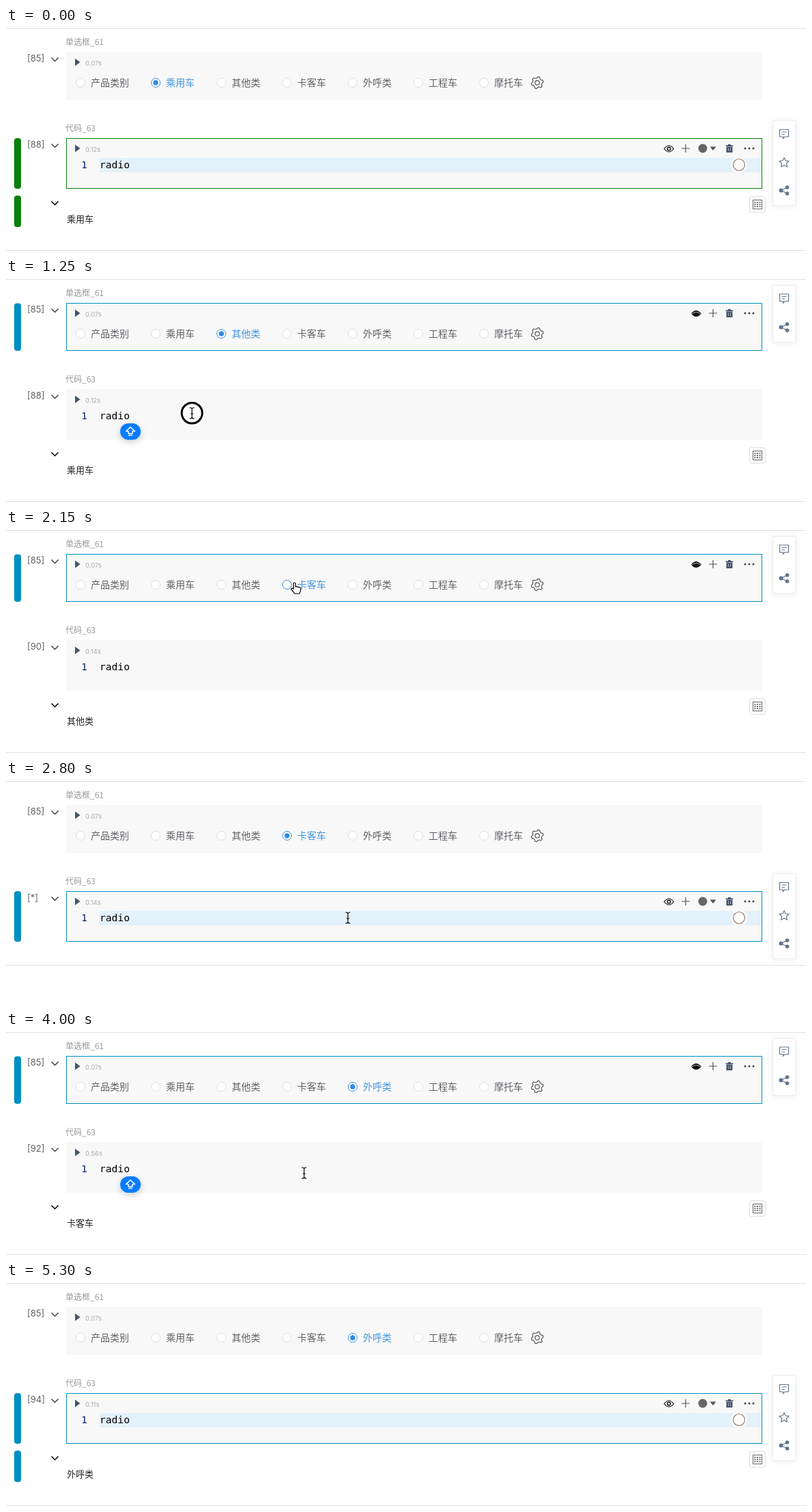
Animation, 1170 px wide and 326 px high, one loop 5520 ms. Source, as an HTML page:

```html
<!DOCTYPE html>
<html lang="zh-CN">
<head>
<meta charset="utf-8">
<style>
html, body { margin: 0; width: 100%; height: 100%; overflow: hidden; background: #fff; }
svg { display: block; width: 1170px; height: 326px; }
text { font: 14px "Noto Sans CJK SC", "Noto Sans CJK", sans-serif; fill: #606266; }
.title { font-size: 12px; fill: #999; }
.count { font: 13px Inter, sans-serif; fill: #616161; }
.time { font: 9.5px Inter, sans-serif; fill: #aaa; }
.code { font: 14.6px "DejaVu Sans Mono", monospace; fill: #000; }
.out { font-size: 13px; fill: #222; }
.add { font-size: 12px; fill: #fff; }
.line { fill: none; stroke: #555; stroke-width: 1.2; }
.slate { fill: none; stroke: #5f7690; stroke-width: 1.2; }
.chevron { fill: none; stroke: #444; stroke-width: 1.5; }
.panel { fill: #fff; stroke: #eee; filter: drop-shadow(0 1px 4px #0001); }
</style>
</head>
<body>
<svg viewBox="0 0 1170 326">
  <defs>
    <path id="chevron" class="chevron" d="M-5-2.5 0 2.5 5-2.5"/>
    <path id="play" d="M101-5.5 108.5 0 101 5.5Z" fill="#44546a"/>
    <g id="tools">
      <path class="line" d="M988 0h12M994-6V6"/>
      <path d="M1052.500-4.500h11v1.500h-11zM1056-6h4v1.500h-4zM1053.500-2.500h9V6h-9z" fill="#44546a"/>
      <path d="M1056.500-.5v4.500M1059.500-.5v4.500" stroke="#aab2bd"/>
      <g fill="#444"><circle cx="1081" r="1.500"/><circle cx="1087" r="1.500"/><circle cx="1093" r="1.500"/></g>
    </g>
    <g id="comment" class="slate">
      <path d="M-6.500-6h13V4.500H1L-1.500 7V4.500h-5zM-3.500-2.500h7M-3.500 1h4.500"/>
    </g>
    <g id="share" fill="#5f7690">
      <path class="slate" d="M4.500-4.500-4.500 0 4.500 4.500"/>
      <circle cx="-4.500" r="3"/><circle cx="4.500" cy="-4.500" r="2.800"/><circle cx="4.500" cy="4.500" r="2.800"/>
    </g>
  </defs>

  <path d="M0 .5h1170" stroke="#e0e0e0"/>
  <path id="bottomLine" d="M0 325.500h1170" stroke="#e0e0e0"/>

  <text class="title" x="87" y="25">单选框_61</text>
  <text class="count" x="31" y="49">[85]</text>
  <use href="#chevron" x="71.500" y="46"/>
  <rect id="radioBox" x="88.500" y="35.500" width="1017" height="69" fill="#f8f8f8"/>
  <use href="#play" y="50"/>
  <text class="time" x="116" y="55">0.07s</text>
  <g id="options"></g>
  <path id="gear" class="line" stroke-linejoin="round"/>
  <circle class="line" cx="777" cy="80" r="3.200"/>

  <text class="title" x="87" y="151">代码_63</text>
  <text id="count" class="count" x="31" y="175"></text>
  <use href="#chevron" x="71.500" y="172"/>
  <rect id="codeBox" x="88.500" y="161.500" width="1017" height="73" fill="#f8f8f8"/>
  <use href="#play" y="176"/>
  <text id="time" class="time" x="116" y="181"></text>
  <rect id="highlight" x="137" y="190" width="968" height="21" fill="#e3f1fa"/>
  <text class="code" x="110" y="205" style="fill:#0b216f">1</text>
  <text class="code" x="137" y="205">radio</text>

  <g id="radioTools">
    <rect x="12" y="35.500" width="10" height="69.500" rx="4" fill="#008fc3"/>
    <path d="M1002 50.500q7-9 15 0-8 9-15 0z" fill="#111"/>
    <path d="M1003 51q6.500-5 13 0" fill="none" stroke="#fff" stroke-width=".7"/>
    <use href="#tools" y="50" clip-path="none" id="plainTools"/>
    <rect class="panel" x="1121.500" y="9.500" width="33" height="83"/>
    <use href="#comment" x="1138" y="28"/>
    <use href="#share" x="1138" y="70.500"/>
  </g>

  <g id="codeTools">
    <rect id="codeBar" x="12" y="161" width="10" height="74" rx="4"/>
    <path class="line" style="stroke:#111" d="M962.500 176.500q7-9 14 0-7 9-14 0z"/>
    <circle cx="969.500" cy="176.500" r="2.300" fill="none" stroke="#111" stroke-width="1.500"/>
    <use href="#tools" y="176"/>
    <circle cx="1019" cy="176" r="6.500" fill="#666"/>
    <path d="M1029.500 173.500h9l-4.500 5.500z" fill="#555"/>
    <circle cx="1072" cy="200" r="12" fill="#fafafa"/>
    <circle cx="1072" cy="200" r="8.500" fill="#fff" stroke="#957b70" stroke-width="1.200"/>
    <rect class="panel" x="1121.500" y="135.500" width="33" height="124"/>
    <use href="#comment" x="1138" y="154.500"/>
    <path class="slate" stroke-linejoin="round" d="M1138 189.500l2.100 4.500 4.900.6-3.600 3.400 1 4.900-4.400-2.500-4.400 2.500 1-4.900-3.600-3.400 4.900-.6z"/>
    <use href="#share" x="1138" y="237.500"/>
  </g>

  <g id="output">
    <rect id="outputBar" x="12" y="245" width="10" height="46" rx="4"/>
    <use href="#chevron" x="71.500" y="256" style="filter:brightness(0)"/>
    <text id="result" class="out" x="89" y="284"></text>
    <rect x="1087.500" y="246.500" width="23" height="23" rx="3" fill="#fff" stroke="#ddd"/>
    <rect class="line" x="1092.500" y="251.500" width="13" height="13" style="stroke:#777"/>
    <path d="M1094.500 255h9M1094.500 258h9M1094.500 261h9" stroke="#777" stroke-width="2" stroke-dasharray="2 1.500"/>
  </g>

  <g id="addBar">
    <path d="M242 116h717" stroke="#3d93e6" stroke-width="2"/>
    <g fill="#b5b5b5" fill-opacity=".9">
      <rect x="523" y="103" width="83" height="24" rx="3"/>
      <rect x="607" y="103" width="71" height="24" rx="3"/>
    </g>
    <text class="add" x="534" y="119">添加单元格</text>
    <text class="add" x="618" y="119">更多类型</text>
  </g>

  <path id="caret" d="M182 191v20" stroke="#000" stroke-width="2"/>
  <g id="badge">
    <rect x="167" y="211" width="30" height="24" rx="12" fill="#087cff" style="filter:drop-shadow(0 3px 5px #0003)"/>
    <path d="M182 216.500l6.500 6h-3.500v3.500h-6v-3.500h-3.500zM179 228.500h6" fill="none" stroke="#fff" stroke-width="1.500" stroke-linejoin="round"/>
  </g>

  <g id="cursor">
    <circle id="ring" r="15" fill="#fff" stroke="#000" stroke-width="3"/>
    <path id="arrow" d="M0 0v14l3.200-3 2.300 5.200 2.500-1.100-2.300-5h4.300z" stroke="#fff"/>
    <path id="hand" d="M-1.500 1q1.500-2 3 0v5q1.500-1 2.500.3 1.700-.8 2.500.6 2.500-.5 2.500 2 0 4-2 7.100H0q-2-3.500-5-6.500.3-2.500 3.500-.5z" fill="#fff" stroke="#000" stroke-width="1.200"/>
    <path id="beam" d="M-3.500-8Q0-8 0-6 0-8 3.500-8M0-6V6M-3.500 8Q0 8 0 6 0 8 3.500 8M-2 1h4" fill="none" stroke="#000" stroke-width="1.200"/>
  </g>
</svg>
<script>
const LOOP = 5520, STEP = 50;
const BLUE = '#008fc3', GREEN = '#078107';
const names = ['产品类别', '乘用车', '其他类', '卡客车', '外呼类', '工程车', '摩托车'];
const $ = id => document.getElementById(id);
const show = (id, on) => $(id).style.display = on ? '' : 'none';

// Each track lists [start time, value...]; the last one started is current.
const selected = [[0, 'code'], [750, 'radio'], [1300, 'code'], [2100, 'radio'], [2600, 'code'], [3600, 'radio'], [4050, 'code']];
const editing = [[0, true], [1500, false], [2600, true], [2700, false], [4050, true], [4250, false]];
const focused = [[0, false], [50, true], [700, false], [1200, true], [1500, false], [2500, true], [2700, false], [3900, true], [4250, false]];
const choices = [[0, 1], [750, 2], [2100, 3], [3600, 4]];
const runs = [[0, 88, '0.12s', 1], [1500, '*', '0.12s'], [1650, 90, '0.14s', 2], [2700, '*', '0.14s'],
  [3300, 92, '0.56s', 3], [4250, '*', '0.56s'], [4350, 94, '0.11s', 4]];
const clicks = [650, 1200, 2000, 2500, 3500, 3900];
const path = [
  [50, 170, 262, 'arrow'], [600, 326, 74, 'arrow'], [650, 321, 79, 'hand'], [800, 321, 79, 'arrow'],
  [1150, 272, 196, 'beam'], [1650, 272, 196, 'arrow'], [2000, 422, 77, 'hand'], [2250, 422, 77, 'arrow'],
  [2500, 500, 200, 'beam'], [2950, 500, 200, 'arrow'], [3250, 505, 126, 'arrow'], [3350, 510, 102, 'arrow'],
  [3500, 517, 80, 'hand'], [3650, 517, 80, 'arrow'], [3850, 436, 206, 'beam'], [4500, 436, 206, 'arrow'],
  [4800, 155, 268, 'arrow'], [5250, 130, 208, 'arrow'], [5300]
];
const at = (track, t) => track.findLast(key => key[0] <= t);

const options = names.map((name, i) => {
  const x = i ? 123 + 96 * i : 109;
  $('options').insertAdjacentHTML('beforeend',
    `<g><circle cx="${x}" cy="80" r="6.5" fill="#fff"/><circle cx="${x}" cy="80" r="3.7" fill="#2f8ae0"/><text x="${x + 15}" y="85">${name}</text></g>`);
  return $('options').lastChild.children;
});

const gearPoints = Array.from({ length: 24 }, (_, i) => {
  const angle = (i + .5) * Math.PI / 12, r = i % 4 < 2 ? 8.8 : 6.8;
  return [777 + r * Math.sin(angle), 80 - r * Math.cos(angle)];
});
$('gear').setAttribute('d', `M${gearPoints.join('L')}Z`);

// The shared plus sign sits 40px further right in the radio cell.
$('plainTools').outerHTML = `<path class="line" d="M1028 50h12M1034 44v12"/>
  <svg x="1045" y="40" width="60" height="20" viewBox="1045 -10 60 20"><use href="#tools"/></svg>`;

function drawCursor(t) {
  const from = at(path, t);
  const visible = from && from.length > 1;
  show('cursor', visible);
  show('addBar', false);
  if (!visible) return;
  const to = path[path.indexOf(from) + 1];
  let p = 0;
  if (to.length > 1 && from[0] < 4800) p = (t - from[0]) / (to[0] - from[0]);
  p = p * p * (3 - 2 * p);
  const [x, y] = [1, 2].map(i => p ? from[i] + (to[i] - from[i]) * p : from[i]);
  $('cursor').setAttribute('transform', `translate(${x} ${y})`);
  for (const kind of ['arrow', 'hand', 'beam']) show(kind, kind === from[3]);
  show('ring', clicks.some(c => t >= c && t < c + 100));
  show('addBar', from[3] === 'arrow' && y > 100 && y < 122);
}

function draw(t) {
  const cell = at(selected, t)[1], onCode = cell === 'code';
  const color = at(editing, t)[1] || t >= 1300 && t < 1500 ? GREEN : BLUE;
  const focus = at(focused, t)[1];
  show('radioTools', !onCode);
  show('codeTools', onCode);
  show('highlight', onCode);
  show('outputBar', onCode);
  show('badge', focus);
  show('caret', focus && onCode);
  $('radioBox').setAttribute('stroke', onCode ? '#f8f8f8' : BLUE);
  $('codeBox').setAttribute('stroke', onCode ? color : '#f8f8f8');
  $('codeBar').setAttribute('fill', color);
  $('outputBar').setAttribute('fill', color);

  const [changed, choice] = at(choices, t);
  options.forEach(([circle, dot, label], i) => {
    const on = i === choice;
    circle.setAttribute('stroke', on ? '#3a8ee6' : '#dcdfe6');
    dot.style.display = on && (!changed || t >= changed + 100) ? '' : 'none';
    label.style.fill = on ? '#4096e0' : '';
  });

  const [, count, time, result] = at(runs, t);
  $('count').textContent = `[${count}]`;
  $('time').textContent = time;
  $('result').textContent = names[result] || '';
  show('output', result);
  $('bottomLine').setAttribute('transform', `translate(0 ${result ? 0 : -56})`);
  drawCursor(t);
}

function frame() {
  const t = performance.now() % LOOP;
  draw(Math.floor(t / STEP) * STEP);
  requestAnimationFrame(frame);
}
frame();
</script>
</body>
</html>
```
